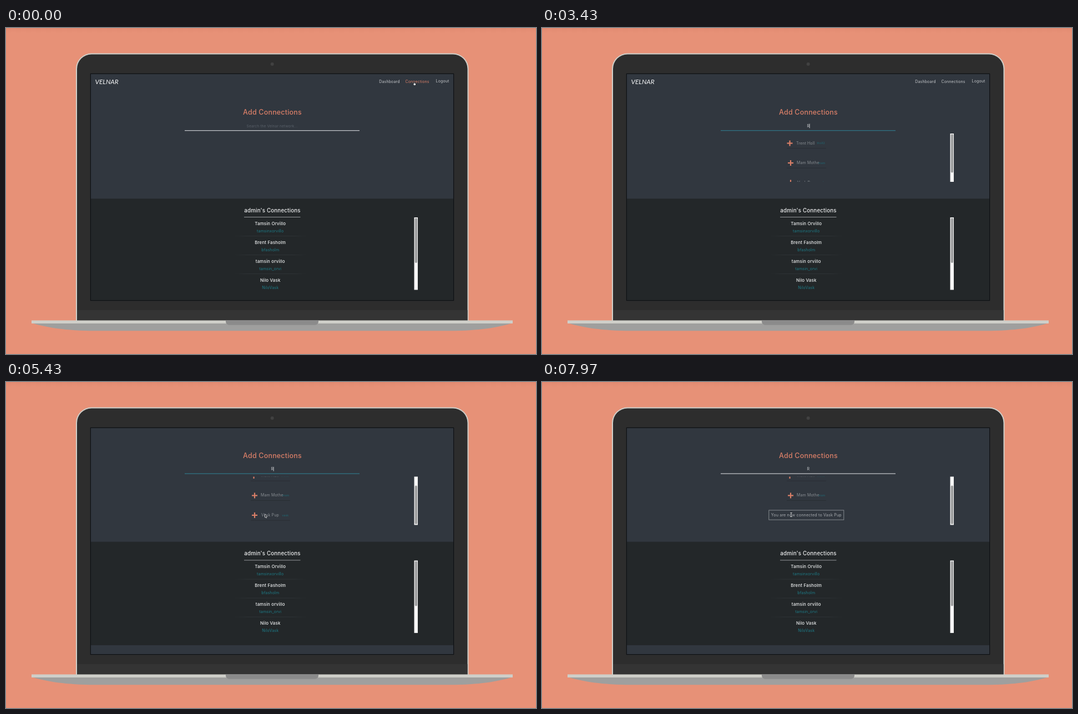
An HTML page with a canvas for the animation above (8000 ms loop, 955x587 px).

```html
<!DOCTYPE html>
<html lang="en">
<head>
<meta charset="utf-8">
<title>Connections</title>
<style>
  html, body { margin: 0; width: 100%; height: 100%; overflow: hidden; background: #e79177; }
  canvas { display: block; width: 955px; height: 587px; }
</style>
</head>
<body>
<canvas id="stage" width="955" height="587"></canvas>
<script>
const ctx = document.getElementById('stage').getContext('2d');
const LOOP = 8000;
const TYPED = 3200, FOCUS = 1700, CLICK = 7000, DONE = 7250;
const CORAL = '#d97f68', TEAL = '#1d7c88', NAVY = '#31373f', DARK = '#232729';

const people = [
  ['Tamsin Orvillo', 'tamsinxorvillo'],
  ['Brent Fasholm', 'bfasholm'],
  ['tamsin orvillo', 'tamsin_orvi'],
  ['Nilo Vask', 'NiloVask']
];
// name, handle, then x of plus, name and handle
const results = [
  ['Trent Holl', 'tholl2', 446.5, 458, 495.5],
  ['Mam Mothe', 'mam', 448, 459, 498],
  ['Vask Pup', 'vask', 448, 460, 497.5]
];

// time, x, y
const path = [
  [0, 736, 100], [350, 736, 100], [1050, 473.5, 173], [3900, 473.5, 173],
  [4350, 467, 239], [5050, 467, 239], [5400, 467, 241], [5900, 467, 241],
  [6500, 449, 242], [7300, 449, 242], [7600, 449, 239], [LOOP, 449, 239]
];

const clamp = v => Math.max(0, Math.min(1, v));
const ease = v => v * v * (3 - 2 * v);
const ramp = (t, a, b) => ease(clamp((t - a) / (b - a)));
const mix = (a, b, k) => a + (b - a) * k;

function cursorAt(t) {
  let i = 1;
  while (i < path.length - 1 && path[i][0] < t) i++;
  const a = path[i - 1], b = path[i], k = ramp(t, a[0], b[0]);
  return [mix(a[1], b[1], k), mix(a[2], b[2], k)];
}

function rect(x, y, w, h, color) {
  ctx.fillStyle = color;
  ctx.fillRect(x, y, w, h);
}

function round(x, y, w, h, r, color) {
  ctx.beginPath();
  ctx.roundRect(x, y, w, h, r);
  ctx.fillStyle = color;
  ctx.fill();
}

// y is the middle of the capitals
function text(str, x, y, size, color, weight = 400, align = 'center') {
  ctx.font = `${weight} ${size}px Inter, sans-serif`;
  ctx.letterSpacing = size * 0.02 + 'px';
  ctx.textAlign = align;
  ctx.fillStyle = color;
  ctx.fillText(str, x, y + size * 0.36);
}

function clipped(x, y, w, h, draw) {
  ctx.save();
  ctx.beginPath();
  ctx.rect(x, y, w, h);
  ctx.clip();
  draw();
  ctx.restore();
}

function scrollbar(y, h, thumbY, thumbH) {
  rect(735.5, y, 6.5, h, '#f6f6f6');
  round(736.8, thumbY, 4.2, thumbH, 2, '#9b9c9d');
}

function laptop() {
  rect(0, 0, 955, 587, '#e79177');
  const glow = ctx.createLinearGradient(0, 0, 0, 9);
  glow.addColorStop(0, '#e28b72');
  glow.addColorStop(1, '#e79177');
  rect(0, 0, 955, 9, glow);

  round(126, 45.5, 707.5, 483, [28, 28, 0, 0], '#d0d0ca');
  round(128, 47.5, 703.5, 481, [26, 26, 0, 0], '#2d2d2d');
  rect(128, 508, 703.5, 19, '#343434');
  ctx.beginPath();
  ctx.arc(479.7, 65, 3, 0, 7);
  ctx.fillStyle = '#414141';
  ctx.fill();
  rect(151.8, 81.8, 655.4, 409.4, '#0e1114');

  ctx.beginPath();
  ctx.moveTo(46.5, 531);
  ctx.bezierCurveTo(70, 539, 110, 545.3, 160, 545.3);
  ctx.lineTo(800, 545.3);
  ctx.bezierCurveTo(850, 545.3, 890, 539, 912.5, 531);
  ctx.fillStyle = '#9f9f9e';
  ctx.fill();
  rect(46, 526.5, 867, 5.5, '#cfcfc9');
  round(396, 526.5, 167, 8.2, [0, 0, 6, 6], '#8b8b8b');
}

function navBar(cursor) {
  ctx.font = 'italic 400 11.8px Lato, sans-serif';
  ctx.letterSpacing = '0px';
  ctx.textAlign = 'left';
  ctx.fillStyle = '#f4f5f6';
  ctx.fillText('VELNAR', 160.5, 100.6);
  const over = cursor[0] > 718 && cursor[0] < 764 && cursor[1] < 104;
  text('Dashboard', 691, 96.5, 7, '#c3c6c9');
  text('Connections', 741, 96.5, 7, over ? CORAL : '#c3c6c9');
  text('Logout', 786.5, 95.7, 7, '#c3c6c9');
}

function searchBox(t) {
  text('Add Connections', 480, 152, 12.4, CORAL, 500);
  const typed = t >= TYPED, focused = t >= FOCUS && t < CLICK;
  if (typed) text('R', 479.7, 176.2, 7, '#c6c9cc');
  else text('Search the Velnar network...', 479.5, 176.2, 6.6, '#596069');
  if (focused && t % 1000 >= 200 && t % 1000 < 700) {
    rect(typed ? 481.7 : 479.5, 172.3, 0.8, 8, '#d5d8da');
  }
  const on = ramp(t, FOCUS, FOCUS + 200) - ramp(t, CLICK, CLICK + 200);
  const line = [[190, 47], [193, 114], [197, 131]].map(([a, b]) => Math.round(mix(a, b, on)));
  rect(322, 184, 315, 1.3, `rgb(${line})`);
}

function plus(x, y) {
  rect(x - 5, y - 1.1, 10, 2.2, CORAL);
  rect(x - 1.1, y - 5, 2.2, 10, CORAL);
}

function resultList(t, cursor) {
  const scroll = 19 * ramp(t, 4500, 4900);
  clipped(300, 190, 430, 87, () => {
    results.forEach(([name, handle, px, nx, hx], i) => {
      let y = 207 + i * 35.5 - scroll;
      if (i === 2 && t >= DONE) {
        ctx.strokeStyle = '#8d9297';
        ctx.lineWidth = 0.9;
        ctx.strokeRect(408.8, y - 8.5, 135, 17.2);
        text('You are now connected to ' + name, 476.3, y, 7.2, '#a5a9ad');
        return;
      }
      if (i === 2 && t > 6000 && cursor[0] < 454) y += 0.8;
      plus(px, y + 0.5);
      text(name, nx, y, 7, '#888d92', 400, 'left');
      text(handle, hx, y + 0.4, 5.2, '#216672', 400, 'left');
      rect(441, y + 9.2, 71, 0.9, '#282d33');
    });
  });
  scrollbar(190, 87, 191 + scroll * 0.8, 69.5);
}

function connections() {
  rect(153, 307.3, 653, 186.2, DARK);
  text("admin's Connections", 480, 328.3, 9.7, '#f0f1f2', 500);
  rect(429, 340, 101.5, 1, '#94979a');
  const fade = ctx.createLinearGradient(410, 0, 543, 0);
  fade.addColorStop(0, '#2f343700');
  fade.addColorStop(0.2, '#2f3437');
  fade.addColorStop(0.8, '#2f3437');
  fade.addColorStop(1, '#2f343700');
  clipped(300, 341, 430, 131, () => {
    people.forEach(([name, handle], i) => {
      const y = 352.2 + i * 34;
      text(name, 476.2, y, 7.9, '#eceeef', 500);
      text(handle, 476.2, y + 13.3, 7.1, TEAL);
      rect(410, y + 22, 133, 0.9, fade);
    });
  });
  scrollbar(341, 130.5, 342, 81);
}

function outline(points, fill, stroke, x, y) {
  ctx.beginPath();
  points.forEach(([a, b]) => ctx.lineTo(x + a, y + b));
  ctx.closePath();
  ctx.lineWidth = 0.9;
  ctx.strokeStyle = stroke;
  ctx.fillStyle = fill;
  ctx.fill();
  ctx.stroke();
}

function hand(x, y) {
  outline([[-1.5, -3], [-0.3, -3], [0.2, -0.8], [2.6, -0.2], [2.5, 2], [1.5, 3.6],
    [-1, 3.6], [-2.8, 0.8], [-1.1, 0.6]], '#f4f4f4', '#20242a', x, y);
}

function arrow(x, y) {
  outline([[0, -3.5], [0, 3], [1.3, 1.9], [2.3, 4], [3.2, 3.5], [2.3, 1.5], [4, 1.3]],
    '#15181b', '#c4c7ca', x - 0.5, y);
}

function beam(x, y) {
  const bars = (grow, color) => {
    rect(x - 0.5 - grow, y - 4 - grow, 1 + grow * 2, 8 + grow * 2, color);
    for (const e of [-4, 3]) rect(x - 1.8 - grow, y + e - grow, 3.6 + grow * 2, 1 + grow * 2, color);
  };
  bars(0.5, '#24282c80');
  bars(0, '#c9cccf');
}

function pointer(t, [x, y]) {
  if (t >= TYPED - 100 && t < 3900) return;
  const inField = y > 168 && y < 185 && x > 322 && x < 637;
  if (t < 1100 && y < 104 && x > 718) hand(x, y);
  else if (inField || t >= DONE) beam(x, y);
  else if (t > 6000 && x < 454) hand(x, y);
  else arrow(x, y);
}

function draw(t) {
  const cursor = cursorAt(t);
  const pageScroll = 19.6 * ramp(t, 5050, 5380);
  laptop();
  clipped(153, 83, 653, 407, () => {
    rect(153, 83, 653, 407, NAVY);
    ctx.save();
    ctx.translate(0, -pageScroll);
    navBar(cursor);
    searchBox(t);
    if (t >= TYPED) resultList(t, cursor);
    connections();
    ctx.restore();
    pointer(t, cursor);
  });
}

function tick() {
  draw(performance.now() % LOOP);
  requestAnimationFrame(tick);
}
tick();
</script>
</body>
</html>
```
